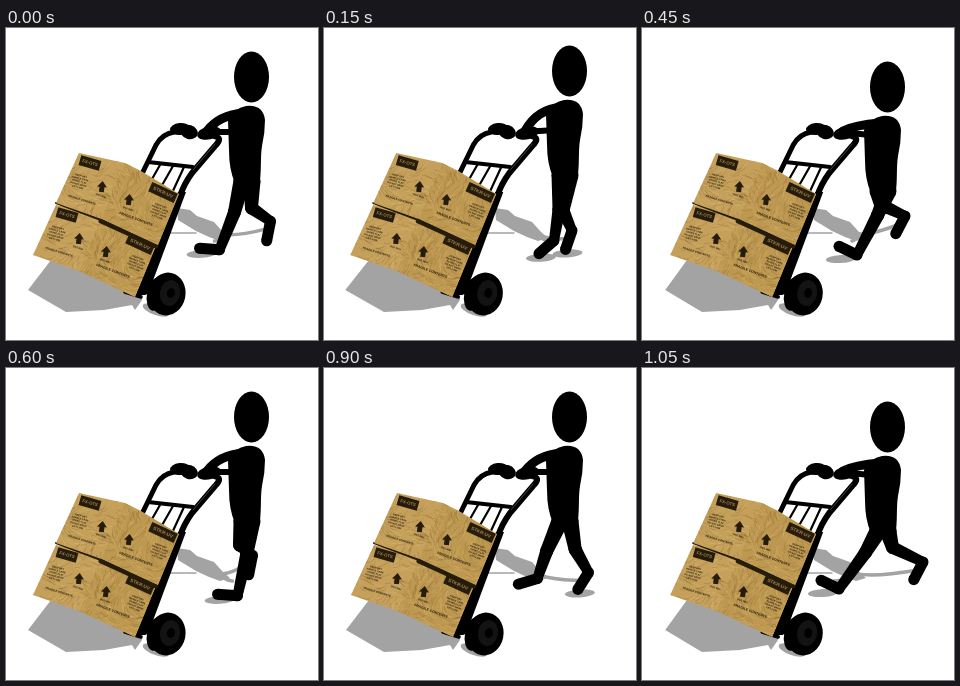
Recreate the animation shown at these times as an HTML page with a canvas. Size 312 px wide and 312 px high, loop 1200 ms.

```html
<!DOCTYPE html>
<html lang="en">
<head>
<meta charset="utf-8">
<title>Hand truck</title>
<style>
html, body { margin: 0; width: 100%; height: 100%; overflow: hidden; background: #fff; }
canvas { display: block; width: 312px; height: 312px; }
</style>
</head>
<body>
<canvas id="stage" width="312" height="312"></canvas>
<script>
const ctx = document.getElementById('stage').getContext('2d');
const STEP = 150, STEPS = 8;
const INK = '#261c0c', SHADE = '#a3a3a3';
const { sin, cos, PI } = Math;

function fill(path, color = '#000') {
  ctx.fillStyle = color;
  ctx.fill(new Path2D(path));
}

function stroke(path, width, color = '#000') {
  ctx.lineWidth = width;
  ctx.strokeStyle = color;
  ctx.lineCap = ctx.lineJoin = 'round';
  ctx.stroke(new Path2D(path));
}

function ellipse(x, y, rx, ry, angle = 0, color = '#000') {
  ctx.beginPath();
  ctx.ellipse(x, y, rx, ry, angle, 0, 2 * PI);
  ctx.fillStyle = color;
  ctx.fill();
}

function shifted(x, y, paint) {
  ctx.save();
  ctx.translate(x, y);
  paint();
  ctx.restore();
}

// Tapered capsule between two joints.
function limb(x1, y1, r1, x2, y2, r2) {
  const a = Math.atan2(y2 - y1, x2 - x1), s = sin(a), c = cos(a);
  fill(`M${x1 - s * r1} ${y1 + c * r1}L${x2 - s * r2} ${y2 + c * r2}
        L${x2 + s * r2} ${y2 - c * r2}L${x1 + s * r1} ${y1 - c * r1}Z`);
  ellipse(x1, y1, r1, r1);
  ellipse(x2, y2, r2, r2);
}

// One leg of the walk; phase 0 is the heel strike, side is -1 (far) or 1 (near).
function legPose(phase, side) {
  const a = phase * 2 * PI, c = cos(a), s = sin(a);
  const swing = 1 - 4 * Math.abs(phase - .5);
  const foot = .65 - .77 * c - .26 * s - .33 * cos(2 * a);
  const ankleX = 239 + 33 * swing + 9 * side;
  const ankleY = 207.5 + 16.5 * c + 8 * s + 3 * side;
  return {
    hipX: 241 + 5 * side,
    kneeX: 237 - 7.5 * c + 4 * s + 6 * side,
    kneeY: 182 + 4 * c + s + 1.5 * side,
    ankleX, ankleY,
    toeX: ankleX - 20 * cos(foot),
    toeY: ankleY + 20 * sin(foot)
  };
}

function drawLeg(p, hipY) {
  limb(p.hipX, hipY, 8.5, p.kneeX, p.kneeY, 6.5);
  limb(p.kneeX, p.kneeY, 6.5, p.ankleX, p.ankleY, 5);
  limb(p.ankleX, p.ankleY, 5.5, p.toeX, p.toeY, 5.5);
}

function shadows(dx, legs) {
  fill(`M${22 + dx} 262L45 232H130L136 272L129 282L126 277L98 282L60 284Z`, SHADE);
  ellipse(150, 282, 14, 5, .35, SHADE);
  stroke('M160 205H190', 1.5, SHADE);
  fill('M171 180L184 182L191 188L208 194L217 204L224 210L214 213L203 209L190 203L172 192Z', SHADE);
  for (const p of legs) {
    stroke(`M207 202Q217 212 ${p.ankleX - 5} ${Math.min(p.ankleY + 8, 213)}`, 3.5, SHADE);
    const ground = Math.max(p.ankleY, p.toeY);
    if (ground > 217) ellipse(p.toeX + 2, ground + 4, 15, 4, -.06, SHADE);
  }
}

function label(text, x, y, angle, size, color = INK, plateWidth = 0) {
  ctx.save();
  ctx.translate(x, y);
  ctx.rotate(angle);
  ctx.fillStyle = INK;
  ctx.fillRect(-plateWidth / 2, -5, plateWidth, 10);
  ctx.font = `bold ${size}px "Liberation Sans", sans-serif`;
  ctx.textAlign = 'center';
  ctx.textBaseline = 'middle';
  ctx.fillStyle = color;
  ctx.fillText(text, 0, 0);
  ctx.restore();
}

function arrow(x, y) {
  shifted(x, y, () => {
    ctx.rotate(.12);
    fill('M0-6L5 0H2.5V5H-2.5V0H-5Z', INK);
  });
  label('THIS WAY', x - 1, y + 9, .3, 2.5);
}

function smallPrint(x, y, angle) {
  ['KEEP DRY', 'HANDLE CARE', 'STORE FLAT', 'DO NOT DROP', 'LIFT LOW'].forEach(
    (text, i) => label(text, x - i * .9, y + i * 2.8, angle, 2.4));
}

function crumple(seed) {
  const random = () => (seed = seed * 16807 % 2147483647) / 2147483647;
  for (let i = 0; i < 600; i++) {
    const x = 45 + random() * 130, y = 120 + random() * 102;
    const a = sin(x / 17) * 1.2 + cos(y / 13) + random() * .5;
    const n = 2 + random() * 4, c = cos(a) * n, s = sin(a) * n;
    stroke(`M${x} ${y}q${c - s * .4} ${s + c * .4} ${c * 2} ${s * 2}`, .7,
      random() < .5 ? 'rgba(130,94,38,.38)' : 'rgba(226,194,122,.42)');
  }
}

function box(seed) {
  const outline = 'M73 125L119 135L135 143L173 166L152 217L96 191L50 175Z';
  fill(outline, '#c4a05b');
  ctx.save();
  ctx.clip(new Path2D(outline));
  fill('M119 135L173 166L152 217L96 191Z', '#bd9851');
  crumple(seed);
  ctx.restore();
  label('FX-OTS', 84, 135, .28, 4.4, '#a18249', 21);
  label('STKR-UV', 157, 164.5, .43, 4.8, '#a18249', 28);
  arrow(96, 159);
  arrow(123, 172);
  smallPrint(75, 148, .26);
  smallPrint(155, 178, .36);
  label('FRAGILE CONTENTS', 76, 172, .3, 2.8);
  label('FRAGILE CONTENTS', 130, 191, .36, 3.5);
}

function cart() {
  ellipse(150, 266, 9, 17, .2);
  stroke('M133 152L150 117Q156 106 168 104', 5);
  stroke('M142 134L187 139', 4);
  stroke('M154 137L146 151M167 138L155 159M178 139L166 165', 2.2);
  stroke('M203 106L211 109Q216 111 209 118L186 145Q178 156 174 168L156 212L138 264', 6);
  stroke('M209 116L187 142', .8, '#555');
  fill('M172 164L180 164L142 266L128 269L148 215Z');
  stroke('M119 264L135 269', 3.5);
  shifted(-23, 52, () => box(71));
  stroke('M50 175L95 192', 2, INK);
  stroke('M95 193L150 218', 5, INK);
  box(19);
  ellipse(161, 266, 18.5, 21.5, .2);
  ellipse(164, 265, 10, 13, .2, '#131313');
  ellipse(165, 265, 4, 5, .2, '#000');
}

function hands() {
  ellipse(174, 101, 10, 6, -.1);
  ellipse(183, 104, 9, 7, .3);
  ellipse(203, 105, 12, 6.5, -.2);
}

function person(dy, legs) {
  legs.forEach(p => drawLeg(p, 153 + dy));
  shifted(0, dy, () => {
    ellipse(245.5, 49, 17.5, 25.5);
    fill('M222 92Q228 80 240 78Q257 76 259 92Q259 105 256 118C254 130 256 145 253 158Q241 166 229 155Q223 142 223 122Z');
  });
  stroke(`M238 ${85 + dy}Q213 ${87 + dy} 201 103`, 9);
  stroke(`M228 ${104 + dy * .3}L198 104`, 6);
}

function draw(step) {
  const a = step * PI / 2;
  const dy = 1 - 8 * sin(a) - cos(2 * a), dx = dy * .12;
  const legs = [
    legPose((step + 1) % STEPS / STEPS, -1),
    legPose((step + 5) % STEPS / STEPS, 1)
  ];
  ctx.fillStyle = '#fff';
  ctx.fillRect(0, 0, 312, 312);
  shadows(dx, legs);
  shifted(dx, 0, cart);
  person(dy, legs);
  hands();
}

let shown = -1;
function tick() {
  const step = Math.floor(performance.now() / STEP) % STEPS;
  if (step !== shown) draw(shown = step);
  requestAnimationFrame(tick);
}
tick();
</script>
</body>
</html>
```
